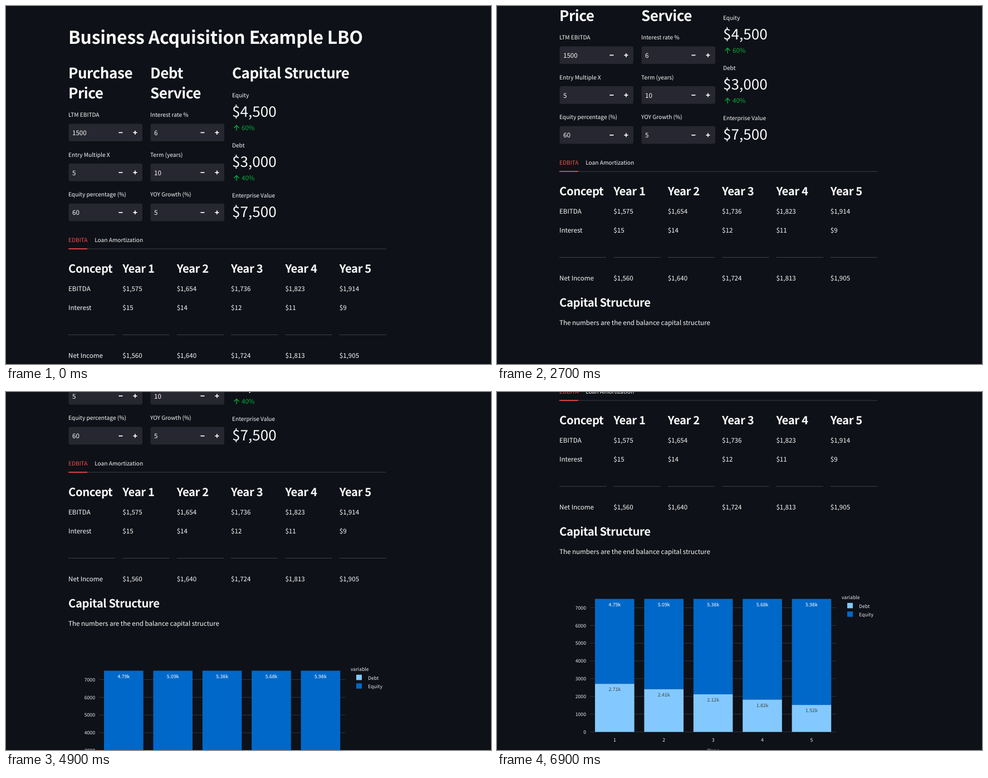
Recreate the animation shown at these times as an HTML page. Size 871x643 px, loop 8 s.

```html
<!DOCTYPE html>
<html lang="en">
<head>
<meta charset="utf-8">
<title>LBO example</title>
<style>
  html, body { margin: 0; width: 100%; height: 100%; overflow: hidden; background: #0e1117; }
  svg { display: block; width: 871px; height: 643px; }
  text {
    font-family: "Noto Sans CJK JP", "Noto Sans CJK SC", "Noto Sans CJK", "Source Sans Pro", "Noto Sans", sans-serif;
    font-size: 11.6px; fill: #fafafa; text-rendering: geometricPrecision; white-space: pre;
  }
  .h1 { font-size: 31.9px; font-weight: 700; letter-spacing: -.0056em; }
  .h2 { font-size: 26.1px; font-weight: 700; letter-spacing: -.019em; }
  .h3 { font-size: 20.3px; font-weight: 700; letter-spacing: -.019em; }
  .label { font-size: 10.16px; }
  .metric { font-size: 26.1px; }
  .delta { fill: #09ab3b; }
  .active { fill: #ff4b4b; }
  .tick { font-size: 8.71px; fill: #e6eaf1; }
  .inBar { font-size: 8.71px; fill: #fff; }
  .inDebt { fill: #444; }
  .axis { font-size: 10.16px; fill: #e6eaf1; }
  .mid { text-anchor: middle; }
  .end { text-anchor: end; }
</style>
</head>
<body>
<svg viewBox="0 0 871 643"><g id="page"></g></svg>
<script>
const page = document.getElementById('page');

function add(tag, attrs) {
  const el = document.createElementNS('http://www.w3.org/2000/svg', tag);
  for (const key in attrs) el.setAttribute(key, attrs[key]);
  return page.appendChild(el);
}
const text = (x, y, str, cls = '') => { add('text', { x, y, class: cls }).textContent = str; };
const rect = (x, y, width, height, fill, rx = 0) => add('rect', { x, y, width, height, fill, rx });
const stroke = (d, color, width) => add('path', { d, fill: 'none', stroke: color, 'stroke-width': width });

// Headings
text(112, 67.5, 'Business Acquisition Example LBO', 'h1');
text(112, 130, 'Purchase', 'h2');
text(112, 165.8, 'Price', 'h2');
text(259, 130, 'Debt', 'h2');
text(259, 165.8, 'Service', 'h2');
text(406, 130, 'Capital Structure', 'h2');

// Number inputs
function input(x, row, label, value) {
  const y = 227.4 + row * 71.7;
  text(x, y - 28.6, label, 'label');
  rect(x + .5, y - 16, 132.5, 31.7, '#262730', 3);
  text(x + 7, y + 4.4, value);
  stroke(`M${x + 90.4} ${y}h7M${x + 116.4} ${y}h7m-3.5 -3.5v7`, '#fafafa', 1.7);
}
[['LTM EBITDA', 1500], ['Entry Multiple X', 5], ['Equity percentage (%)', 60]]
  .forEach(([label, value], i) => input(112, i, label, value));
[['Interest rate %', 6], ['Term (years)', 10], ['YOY Growth (%)', 5]]
  .forEach(([label, value], i) => input(259, i, label, value));

// Metrics
[['Equity', '$4,500', '60%'], ['Debt', '$3,000', '40%'], ['Enterprise Value', '$7,500']]
  .forEach(([label, value, delta], i) => {
    const y = 164 + i * 90;
    text(406, y, label, 'label');
    text(406, y + 34.7, value, 'metric');
    if (!delta) return;
    text(423, y + 59.2, delta, 'delta');
    stroke(`M414 ${y + 60}v-9.4m-4.6 4.6l4.6 -4.6l4.6 4.6`, '#09ab3b', 1.4);
  });

// Tabs
text(112, 423.6, 'EDBITA', 'label active');
text(159.2, 423.6, 'Loan Amortization', 'label');
rect(112, 435.4, 571, 1.6, '#2b2d35');
rect(112, 435.4, 34, 1.6, '#ff4b4b');

// Table
[
  ['Concept', 'EBITDA', 'Interest', 'Net Income'],
  ['Year 1', '$1,575', '$15', '$1,560'],
  ['Year 2', '$1,654', '$14', '$1,640'],
  ['Year 3', '$1,736', '$12', '$1,724'],
  ['Year 4', '$1,823', '$11', '$1,813'],
  ['Year 5', '$1,914', '$9', '$1,905']
].forEach(([head, ebitda, interest, net], i) => {
  const x = 112 + i * 97.35;
  text(x, 478.6, head, 'h3');
  text(x, 511.8, ebitda);
  text(x, 545.9, interest);
  rect(x, 590, 84.3, 1, '#3d4045');
  text(x, 631.9, net);
});

text(112, 678.7, 'Capital Structure', 'h3');
text(112, 712.2, 'The numbers are the end balance capital structure');

// Stacked bar chart
const zero = 1031.5, unit = 31.86;
const light = '#83c9ff', blue = '#0068c9';
for (let k = 0; k < 8; k++) {
  const y = zero - k * unit;
  rect(167, y - .5, 442, 1, '#31333f');
  text(160, y + 3.2, k * 1000, 'tick end');
}
[[2.71, 4.79], [2.41, 5.09], [2.12, 5.38], [1.82, 5.68], [1.52, 5.98]]
  .forEach(([debt, equity], i) => {
    const x = 176 + i * 88.4, mid = x + 35.3;
    const top = zero - 7.5 * unit, split = zero - debt * unit;
    rect(x, top, 70.6, split - top, blue);
    rect(x, split, 70.6, zero - split, light);
    text(mid, top + 13.5, equity + 'k', 'inBar mid');
    text(mid, split + 13.2, debt + 'k', 'inBar inDebt mid');
    text(mid, zero + 17.2, i + 1, 'tick mid');
  });
text(388, 1069, 'Year', 'axis mid');

// Legend
text(619, 793.2, 'variable', 'tick');
[['Debt', light], ['Equity', blue]].forEach(([name, color], i) => {
  rect(629, 799.8 + i * 15.4, 10, 9.6, color);
  text(650, 808.5 + i * 15.4, name, 'tick');
});

// Scroll bursts: start time, then one offset per 100 ms
const loop = 8000;
const bursts = [
  [1000, 8, 20, 26],
  [1400, 42, 52],
  [1800, 64, 75, 86, 97, 103],
  [2400, 106],
  [2700, 139, 143, 145],
  [3200, 153],
  [3500, 164, 175, 185, 194, 203, 212, 220, 226],
  [4500, 240, 254, 267, 280, 292, 303, 314, 324, 332, 342, 351, 359],
  [5800, 368, 374],
  [6200, 384, 391, 396],
  [6600, 404, 411, 417, 421]
];

function scrollAt(t) {
  let offset = 0;
  for (const [start, ...steps] of bursts) {
    if (t < start) break;
    offset = steps[Math.min(steps.length - 1, Math.floor((t - start) / 100))];
  }
  return offset;
}

const began = performance.now();
function draw() {
  const t = Math.max(0, performance.now() - began) % loop;
  page.setAttribute('transform', `translate(0 ${-scrollAt(t)})`);
  requestAnimationFrame(draw);
}
draw();
</script>
</body>
</html>
```
